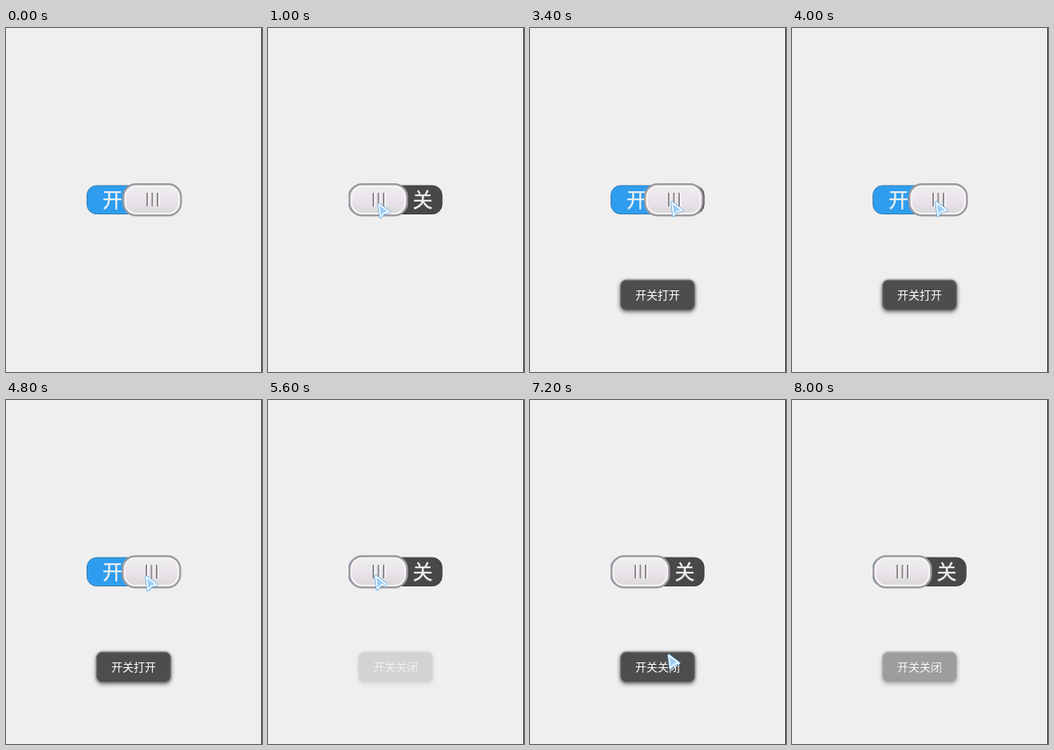
An HTML page for the animation above (8200 ms loop, 321 px wide and 430 px high).

```html
<!DOCTYPE html>
<html lang="zh-CN">
<head>
<meta charset="utf-8">
<style>
  html, body { margin: 0; width: 100%; height: 100%; overflow: hidden; background: #efefef; }
  svg { display: block; width: 100vw; height: 100vh; }
  text { font-family: "Noto Sans CJK SC", "Noto Sans CJK", sans-serif; text-anchor: middle; fill: #f0f0f0; }
  .state { font-size: 25px; stroke: #f0f0f0; stroke-width: .4; }
  #label { font-size: 14px; fill: #fff; }
  #toast { filter: drop-shadow(0 1px 2px rgba(0, 0, 0, .35)) drop-shadow(0 2px 2.5px rgba(0, 0, 0, .35)); }
</style>
</head>
<body>
<svg viewBox="0 0 321 430">
  <defs>
    <linearGradient id="face" x2="0" y2="1">
      <stop offset="0" stop-color="#eeeeee"/>
      <stop offset=".55" stop-color="#ebe3eb"/>
      <stop offset="1" stop-color="#d9d9d9"/>
    </linearGradient>
    <rect id="track" x="101.5" y="197" width="116.7" height="35.5" rx="12"/>
    <path id="arrow" d="M1 1L3 17.5L7.5 12.5L14 11Z"/>
    <clipPath id="onSide"><rect id="onClip" y="190" height="50"/></clipPath>
    <clipPath id="offSide"><rect id="offClip" y="190" width="120" height="50"/></clipPath>
  </defs>
  <rect width="321" height="430" fill="#efefef"/>
  <rect x="320" width="1" height="430" fill="#333"/>

  <g clip-path="url(#onSide)">
    <use href="#track" fill="#2f9def" stroke="#3a7caf"/>
    <text class="state" x="133.5" y="223.7">开</text>
  </g>
  <g clip-path="url(#offSide)">
    <use href="#track" fill="#484848" stroke="#3f3f3f"/>
    <text class="state" x="194" y="223.7">关</text>
  </g>

  <g id="knob">
    <rect x="1.2" y="195.2" width="72.2" height="39.1" rx="16" fill="#f8f5f8" stroke="#9d9a9f" stroke-width="2.4"/>
    <rect x="4.5" y="198.5" width="65.6" height="32.5" rx="13" fill="url(#face)"/>
    <path d="M32.5 206v17M39 206v17M45.5 206v17" stroke="#fafafa" stroke-width="2"/>
    <path d="M31 206v17M37.5 206v17M44 206v17" stroke="#8c8a8c" stroke-width="2"/>
  </g>

  <g id="toast">
    <rect x="113.7" y="315.2" width="92.6" height="37.3" rx="7" fill="#4d4d4d" stroke="#707070" stroke-width="1.2"/>
    <text id="label" x="160" y="339"></text>
  </g>

  <g id="cursor" stroke-linejoin="round">
    <use href="#arrow" stroke="#5ba9e2" stroke-width="3.4"/>
    <use href="#arrow" fill="#9ccdf6" stroke="#f3faff" stroke-width="1.8"/>
  </g>
</svg>
<script>
  const LOOP = 8200, TICK = 200;
  const LEFT = 101, RIGHT = 146, TRAVEL = RIGHT - LEFT;
  const $ = id => document.getElementById(id);
  const set = (id, name, value) => $(id).setAttribute(name, value);

  // Progress from 0 to 1 between two times
  const ramp = (t, from, to) => Math.min(1, Math.max(0, (t - from) / (to - from)));

  // Half-hearted drag: slow pull to the left, quick return
  const tug = t => -14 * Math.sin(Math.PI * ramp(t, 3200, 4000) ** 2);

  function knobAt(t) {
    const toggles = ramp(t, 2000, 2200) - ramp(t, 400, 1000) - ramp(t, 5200, 5600);
    const nudge = 3 * ramp(t, 4400, 4800) - 4 * ramp(t, 4000, 4200);
    return Math.max(LEFT, Math.round(RIGHT + TRAVEL * toggles + tug(t) + nudge));
  }

  function cursorAt(t) {
    let x = 167, y = 207;
    const glide = (from, to, toX, toY) => {
      const p = ramp(t, from, to);
      x += (toX - x) * p;
      y += (toY - y) * p;
    };
    glide(400, 1000, 138, 219);
    glide(1200, 1600, 206, 221);
    glide(1600, 2000, 201, 220);
    glide(2600, 3400, 180, 217);
    glide(4000, 4200, 175, 220);
    glide(5200, 5800, 113, 218);
    glide(6000, 6400, 225, 202);
    glide(7000, 7200, 173, 318);
    return [Math.round(x + tug(t)), Math.round(y)];
  }

  const toasts = [
    { text: "开关关闭", start: 1000, end: 3000 },
    { text: "开关打开", start: 2800, end: 5600 },
    { text: "开关关闭", start: 5500, end: 8200 },
  ];
  const fade = (t, { start, end }) => Math.min(ramp(t, start, start + 600), 1 - ramp(t, end - 400, end));

  function draw(now) {
    const t = Math.floor(now % LOOP / TICK) * TICK;
    const knobX = knobAt(t), middle = knobX + 37;
    set("knob", "transform", `translate(${knobX})`);
    set("onClip", "width", middle);
    set("offClip", "x", middle);
    set("cursor", "transform", `translate(${cursorAt(t)})`);
    set("cursor", "visibility", t >= 200 && t < 8000 ? "visible" : "hidden");

    const toast = toasts.find(({ end }) => t < end);
    set("toast", "opacity", fade(t, toast));
    $("label").textContent = toast.text;
  }

  const start = performance.now();
  function frame() {
    draw(performance.now() - start);
    requestAnimationFrame(frame);
  }
  frame();
</script>
</body>
</html>
```
